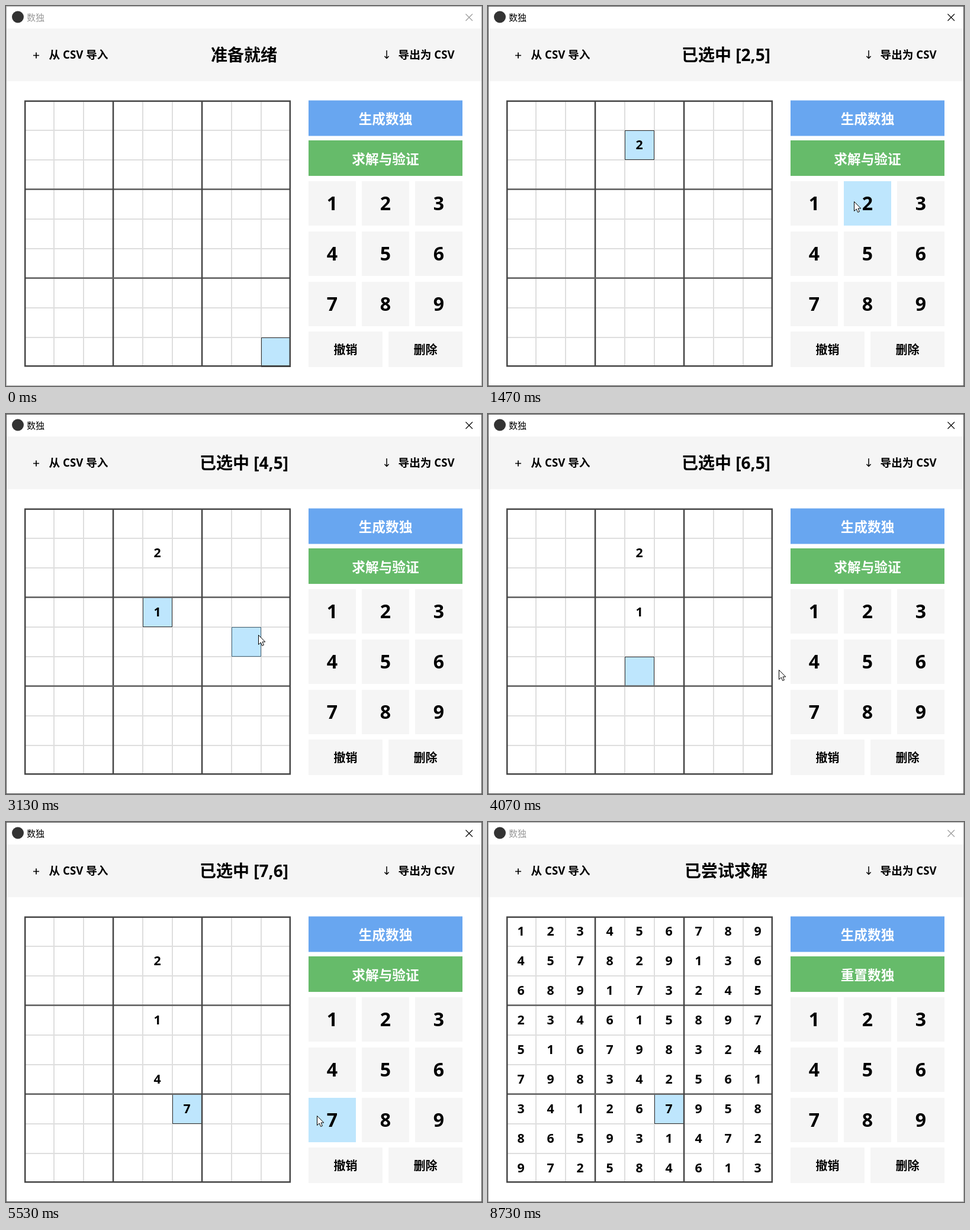
An HTML page with a canvas for the animation above (9.13 s loop, 804 by 642 pixels).

```html
<!DOCTYPE html>
<html lang="zh">
<head>
<meta charset="utf-8">
<title>数独</title>
<style>
html, body { margin: 0; width: 100%; height: 100%; overflow: hidden; background: #fff; }
canvas { display: block; }
</style>
</head>
<body>
<canvas id="stage" width="804" height="642"></canvas>
<script>
const ctx = document.getElementById('stage').getContext('2d');
const LOOP = 9130, STEP = 200 / 3;
const FACE = '"Open Sans", "Noto Sans CJK SC", sans-serif';
const LIGHT = '#bee6fd', PALE = '#f5f5f5';

// Pointer path: time, x, y
const path = [
  [130, 700, 640], [730, 253, 240], [870, 253, 240], [1200, 618, 330],
  [1470, 618, 330], [1870, 262, 352], [2000, 262, 352], [2130, 299, 357],
  [2330, 299, 357], [2730, 535, 345], [2930, 535, 345], [3270, 366, 388],
  [3530, 262, 440], [3730, 262, 440], [4200, 527, 432], [4400, 527, 432],
  [4730, 297, 488], [4930, 297, 488], [5330, 525, 496], [5730, 525, 496],
  [6400, 648, 248], [7330, 648, 248], [7470, 674, 240], [7600, 674, 240],
  [7670, 676, 239], [8130, 676, 239], [8200, 676, 231], [8270, 676, 218]
];
const pass = { time: 4070, x: 493, y: 432 };

// Cell selections: time, row, column
const picks = [[0, 9, 9], [730, 2, 5], [2000, 4, 5], [3670, 6, 5], [4870, 7, 6]];
// Typed digits: time, row, column, digit
const typed = [[1400, 2, 5, 2], [2870, 4, 5, 1], [4270, 6, 5, 4], [5470, 7, 6, 7]];
const SOLVED_AT = 6600;
const solution = [
  '123456789', '457829136', '689173245',
  '234615897', '516798324', '798342561',
  '341267958', '865931472', '972584613'
];

function box(x, y, w, h, color) {
  ctx.fillStyle = color;
  ctx.fillRect(x, y, w, h);
}

function text(str, x, y, size, color = '#000', align = 'center', weight = 'bold') {
  ctx.font = `${weight} ${size}px ${FACE}`;
  ctx.textAlign = align;
  ctx.fillStyle = color;
  ctx.fillText(str, x, y);
}

function strokes(d, color, width) {
  ctx.strokeStyle = color;
  ctx.lineWidth = width;
  ctx.stroke(new Path2D(d));
}

function pointerAt(t) {
  if (t < path[0][0] || t >= 8330) return null;
  let i = path.findIndex(p => p[0] > t);
  if (i < 0) i = path.length;
  const a = path[i - 1], b = path[i] || a;
  let u = b === a ? 0 : (t - a[0]) / (b[0] - a[0]);
  u = u * u * (3 - 2 * u);
  let x = a[1] + (b[1] - a[1]) * u, y = a[2] + (b[2] - a[2]) * u;
  if (a[0] < pass.time && b[0] > pass.time) {
    // Keep this leg passing through its known waypoint
    const first = t < pass.time;
    const v = first ? (t - a[0]) / (pass.time - a[0]) : (t - pass.time) / (b[0] - pass.time);
    const e = first ? v * v * (2 - v) : 1 - (1 - v) ** 2;
    const from = first ? { x: a[1], y: a[2] } : pass;
    const to = first ? pass : { x: b[1], y: b[2] };
    x = from.x + (to.x - from.x) * e;
    y = from.y + (to.y - from.y) * e;
  }
  return { x: Math.round(x), y: Math.round(y) };
}

const inside = (p, x, y, w, h) => p && p.x >= x && p.x < x + w && p.y >= y && p.y < y + h;

function drawWindow(active) {
  box(0, 0, 804, 642, '#fff');
  box(1, 38, 802, 89, PALE);
  ctx.strokeStyle = active ? '#555' : '#a5a5a5';
  ctx.lineWidth = 1;
  ctx.strokeRect(0.5, 0.5, 803, 641);
  ctx.fillStyle = '#333';
  ctx.beginPath();
  ctx.arc(20, 18.5, 10, 0, 2 * Math.PI);
  ctx.fill();
  text('数独', 35, 25, 15, active ? '#000' : '#999', 'left', 'normal');
  strokes('M776.5 13.5l11.5 11.5m0 -11.5l-11.5 11.5', active ? '#000' : '#999', 1.1);
}

function drawHeader(title) {
  strokes('M46 83.5h10m-5 -5v10', '#000', 1.7);
  text('从 CSV 导入', 72.5, 89.3, 18.67, '#000', 'left');
  text(title, 402, 92.5, 28);
  strokes('M643 75v13.5m-3.6 -3.8l3.6 3.8l3.6 -3.8', '#000', 1.5);
  text('导出为 CSV', 662.5, 89.3, 18.67, '#000', 'left');
}

function drawCell(row, col, edge) {
  const x = 50 * col - 19, y = 50 * row + 110;
  box(x, y, 50, 50, LIGHT);
  ctx.strokeStyle = edge;
  ctx.lineWidth = 1;
  ctx.strokeRect(x + 0.5, y + 0.5, 49, 49);
}

function drawBoard(t, p) {
  for (let i = 1; i < 9; i++) {
    if (i % 3 === 0) continue;
    box(30 + 50 * i, 161, 2, 447, '#dedede');
    box(33, 159 + 50 * i, 447, 2, '#dedede');
  }
  const [, row, col] = picks.filter(k => k[0] <= t).pop();
  const over = inside(p, 31, 160, 450, 450);
  const hr = over ? Math.floor((p.y - 160) / 50) + 1 : 0;
  const hc = over ? Math.floor((p.x - 31) / 50) + 1 : 0;
  const same = hr === row && hc === col;
  if (over && !same) drawCell(hr, hc, '#47687c');
  drawCell(row, col, same ? '#3c7fb1' : '#333');

  for (const i of [1, 2]) {
    box(32, 158.3 + 150 * i, 448, 2.7, '#666');
    box(29.8 + 150 * i, 160, 2.5, 449, '#444');
  }
  ctx.strokeStyle = '#444';
  ctx.lineWidth = 2.5;
  ctx.strokeRect(32.2, 160.7, 447.6, 447.6);

  const put = (r, c, d) => text(d, 50 * c + 5.5, 50 * r + 142.3, 21.33);
  if (t >= SOLVED_AT) {
    solution.forEach((line, r) => [...line].forEach((d, c) => put(r + 1, c + 1, d)));
  } else {
    typed.filter(k => k[0] <= t).forEach(([, r, c, d]) => put(r, c, d));
  }
}

function drawPanel(t, p) {
  box(511, 159.5, 260, 60, '#68a6f0');
  text('生成数独', 641, 198.6, 22.67, '#fff');
  box(511, 227, 260, 60, inside(p, 511, 227, 260, 60) ? '#43a047' : '#66bb6a');
  text(t >= SOLVED_AT ? '重置数独' : '求解与验证', 641, 267, 22.67, '#fff');

  const key = (label, x, y, w, h, base, size) => {
    box(x, y, w, h, inside(p, x, y, w, h) ? LIGHT : PALE);
    text(label, x + w / 2, y + base, size);
  };
  for (let i = 0; i < 9; i++) {
    key(i + 1, 511 + 90 * (i % 3), 296 + 85 * Math.floor(i / 3), 80, 75, 49, 32);
  }
  key('撤销', 511, 550, 125, 60, 37.7, 20);
  key('删除', 646, 550, 125, 60, 37.7, 20);
}

const arrow = new Path2D('M.5 .5V16.5L4.3 13L6.7 18.5L9.4 17.3L7 12H11.8Z');
const hand = new Path2D('M-1.5 13V1.5Q0 -.5 1.5 1.5V7Q3.2 5.5 4.5 7.5Q6.3 6.3 7.5 8.5' +
  'Q9.5 7.5 10.5 10V15L8.5 18.5V21.5H-1.5V19L-6 13Q-6.5 10 -4 11Z');
const fingers = new Path2D('M1.5 7V11M4.5 7.5V11M7.5 8.5V11');

function drawPointer(p) {
  if (!p) return;
  const link = inside(p, 511, 227, 260, 60);
  ctx.save();
  ctx.translate(p.x, p.y);
  ctx.fillStyle = '#fff';
  ctx.strokeStyle = '#000';
  ctx.lineWidth = 1;
  ctx.fill(link ? hand : arrow);
  ctx.stroke(link ? hand : arrow);
  if (link) ctx.stroke(fingers);
  ctx.restore();
}

function headline(t) {
  if (t >= SOLVED_AT) return '已尝试求解';
  const [time, row, col] = picks.filter(k => k[0] <= t).pop();
  return time ? `已选中 [${row},${col}]` : '准备就绪';
}

function draw(now) {
  const t = Math.floor((now % LOOP + 3.4) / STEP) * STEP;
  const p = pointerAt(t);
  drawWindow(t >= 730 && t < 8730);
  drawHeader(headline(t));
  drawBoard(t, p);
  drawPanel(t, p);
  drawPointer(p);
}

const start = performance.now();
function tick() {
  draw(performance.now() - start);
  requestAnimationFrame(tick);
}
tick();
</script>
</body>
</html>
```
